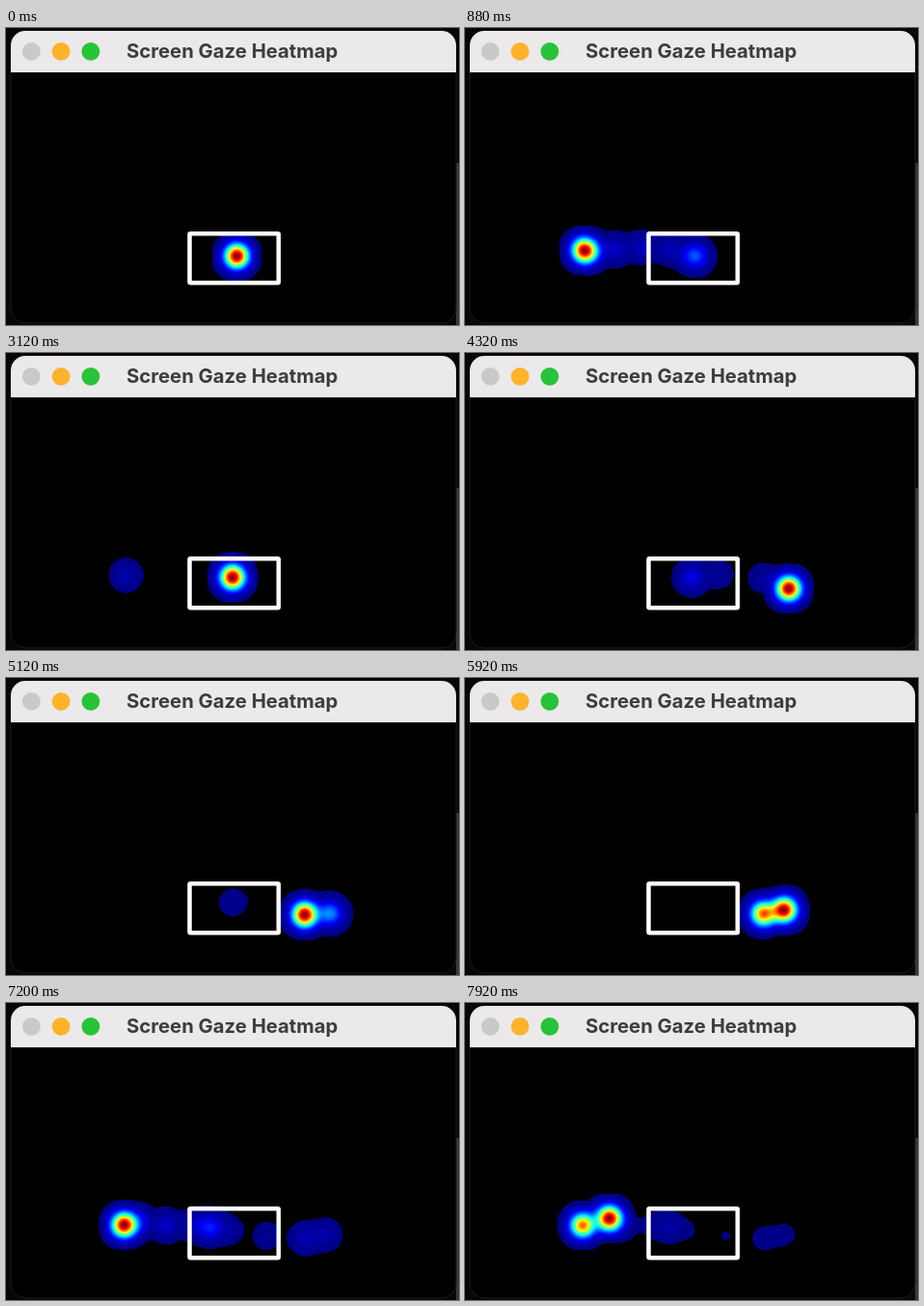
Animation of 470 by 308 pixels, one loop 8 s. Source, as an HTML page with a canvas:

```html
<!DOCTYPE html>
<html lang="en">
<head>
<meta charset="utf-8">
<title>Screen Gaze Heatmap</title>
<style>
html, body { margin: 0; width: 100%; height: 100%; overflow: hidden; background: #000; }
canvas { display: block; }
</style>
</head>
<body>
<canvas id="view" width="470" height="308"></canvas>
<script>
const ctx = document.getElementById('view').getContext('2d');
const W = 470, H = 308;
const STEP = 80, STEPS = 100;
const DECAY = 0.83, SIGMA = 8.2, REACH = 25, MEMORY = 45, TREMOR = 2.5;

// Heat field, covering the band of the window the gaze visits
const X0 = 60, Y0 = 170, FW = 340, FH = 120;
const field = new Float32Array(FW * FH);
const heat = document.createElement('canvas');
heat.width = FW;
heat.height = FH;
const heatCtx = heat.getContext('2d');
const pixels = heatCtx.createImageData(FW, FH);

// The gaze rests on each point until the next one's start, then travels there
const rests = [
  { start: -60, travel: 1, x: 239, y: 236, lift: 0 },
  { start: 1, travel: 6, x: 124, y: 230, lift: 7 },
  { start: 23, travel: 1, x: 235, y: 232, lift: 0 },
  { start: 42, travel: 3, x: 336, y: 244, lift: 8 },
  { start: 57, travel: 1, x: 309, y: 244, lift: 0 },
  { start: 71, travel: 1, x: 330, y: 240, lift: 0 },
  { start: 75, travel: 4, x: 211, y: 233, lift: -3 },
  { start: 82, travel: 4, x: 122, y: 230, lift: 2 },
  { start: 96, travel: 1, x: 150, y: 222, lift: 0 }
];

const kernel = Array.from({ length: REACH + 1 }, (_, d) => Math.exp(-d * d / (2 * SIGMA * SIGMA)));
const smooth = t => t * t * (3 - 2 * t);
const mix = (a, b, t) => a + (b - a) * t;

// Seeded noise in -1..1
function noise(n) {
  const s = Math.sin(n * 127.1) * 43758.5453;
  return 2 * (s - Math.floor(s)) - 1;
}

function gazeAt(step) {
  const i = rests.findLastIndex(r => r.start <= step);
  const to = rests[i], from = rests[i - 1] || to;
  const t = smooth(Math.min(1, (step - to.start + 1) / to.travel));
  const shake = step > 0 ? TREMOR : 0;
  return [
    Math.round(mix(from.x, to.x, t) + shake * noise(step)),
    Math.round(mix(from.y, to.y, t) - to.lift * Math.sin(Math.PI * t) + shake * noise(step + 0.5))
  ];
}

function addSpot(x, y, power) {
  for (let dy = -REACH; dy <= REACH; dy++) {
    const row = (y - Y0 + dy) * FW + x - X0;
    const k = power * kernel[Math.abs(dy)];
    for (let dx = -REACH; dx <= REACH; dx++) field[row + dx] += k * kernel[Math.abs(dx)];
  }
}

const ramp = (v, center) => 255 * Math.max(0, Math.min(1, 1.5 - Math.abs(4 * v - center)));

function paintHeat(step) {
  field.fill(0);
  for (let age = 0; age < MEMORY; age++) addSpot(...gazeAt(step - age), DECAY ** age);
  const peak = field.reduce((a, b) => Math.max(a, b), 0);
  const out = pixels.data;
  field.forEach((h, i) => {
    const v = h / peak, p = i * 4;
    out[p] = ramp(v, 3);
    out[p + 1] = ramp(v, 2);
    out[p + 2] = ramp(v, 1);
    out[p + 3] = v * 255 >= 1 ? 255 : 0;
  });
  heatCtx.putImageData(pixels, 0, 0);
  ctx.drawImage(heat, X0, Y0);
}

function box(x, y, w, h, r) {
  ctx.beginPath();
  ctx.roundRect(x, y, w, h, r);
}

function paintWindow() {
  ctx.fillStyle = '#080608';
  ctx.fillRect(0, 0, W, H);
  ctx.fillStyle = '#3a393a';
  ctx.fillRect(467, 140, 3, 168);

  box(5, 3, 462, 303, 15);
  ctx.fillStyle = '#000';
  ctx.fill();
  ctx.strokeStyle = '#1c1c1c';
  ctx.lineWidth = 1;
  ctx.stroke();

  box(5, 3, 462, 43, [15, 15, 0, 0]);
  ctx.fillStyle = '#ebe9ea';
  ctx.fill();

  ['#cac9ca', '#fdb32a', '#27c338'].forEach((color, i) => {
    ctx.beginPath();
    ctx.arc(26.3 + 30.8 * i, 24.3, 9.4, 0, 2 * Math.PI);
    ctx.fillStyle = color;
    ctx.fill();
  });

  ctx.fillStyle = '#3d3c3d';
  ctx.font = '700 20.3px Inter, Roboto, sans-serif';
  ctx.fillText('Screen Gaze Heatmap', 125, 31);
}

function paint(step) {
  paintWindow();
  paintHeat(step);
  box(190.5, 213.3, 92.3, 51, 1);
  ctx.strokeStyle = '#fff';
  ctx.lineWidth = 4.5;
  ctx.stroke();
}

let shown = -1;
function tick() {
  const step = Math.floor(performance.now() / STEP) % STEPS;
  if (step !== shown) paint(shown = step);
  requestAnimationFrame(tick);
}
tick();
</script>
</body>
</html>
```
